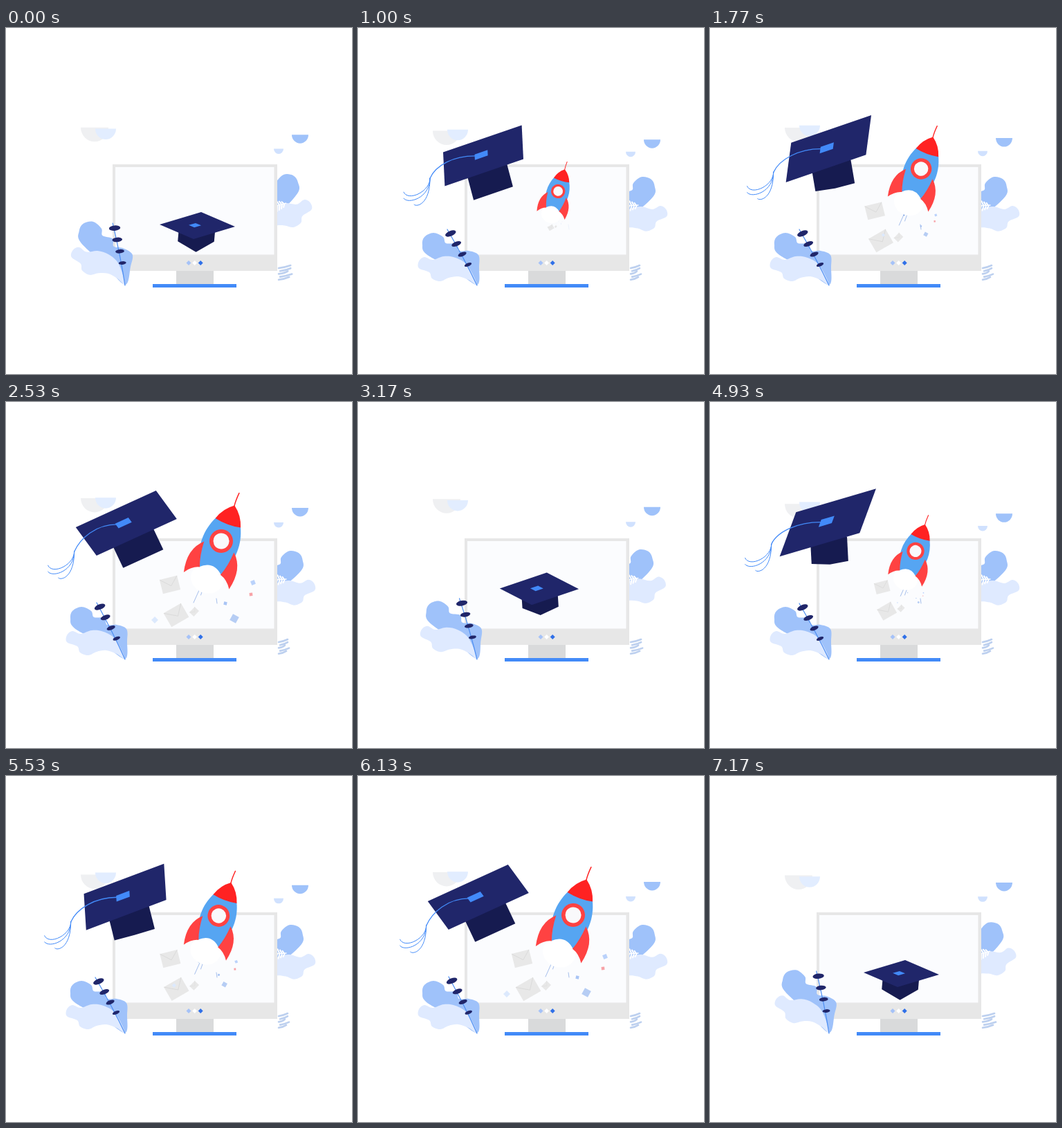
Write an HTML page with a canvas that moves like this. It is 500 by 500 pixels and loops after 7.21 s.

```html
<!DOCTYPE html>
<html lang="en">
<head>
<meta charset="utf-8">
<title>Launch of learning</title>
<style>
html, body { margin: 0; width: 100%; height: 100%; overflow: hidden; background: #fff; }
canvas { display: block; width: 500px; height: 500px; }
</style>
</head>
<body>
<canvas id="stage" width="500" height="500"></canvas>
<script>
const ctx = document.getElementById('stage').getContext('2d');
const LOOP = 7210, PERIOD = 3600, RAD = Math.PI / 180;
const NAVY = '#20266a', DEEP = '#161b50', BLUE = '#428af8', RED = '#ff4242';
const LEAF_BLUE = '#9fc2fa', PALE_BLUE = '#dfeaff';

// Time and value helpers
const clamp = x => Math.min(1, Math.max(0, x));
const span = (t, from, to) => clamp((t - from) / (to - from));
const ease = (t, from, to) => (1 - Math.cos(Math.PI * span(t, from, to))) / 2;
const out = (s, power) => 1 - (1 - s) ** power;
const mix = (a, b, s) => a + (b - a) * s;
const wave = (t, mid, amp, delay) => mid + amp * Math.sin((t - delay) / PERIOD * 2 * Math.PI);

// Drawing helpers
function fill(color, d) {
  ctx.fillStyle = color;
  ctx.fill(new Path2D(d));
}
function line(color, width, d) {
  ctx.strokeStyle = color;
  ctx.lineWidth = width;
  ctx.lineCap = ctx.lineJoin = 'round';
  ctx.stroke(new Path2D(d));
}
function rect(color, x, y, w, h) {
  ctx.fillStyle = color;
  ctx.fillRect(x, y, w, h);
}
function ellipse(color, x, y, rx, ry = rx, rot = 0, to = 360) {
  ctx.fillStyle = color;
  ctx.beginPath();
  ctx.ellipse(x, y, rx, ry, rot * RAD, 0, to * RAD);
  ctx.fill();
}
function placed(x, y, angle, scale, draw) {
  ctx.save();
  ctx.translate(x, y);
  ctx.rotate(angle * RAD);
  ctx.scale(scale, scale);
  draw();
  ctx.restore();
}
const poly = points => `M${points.join('L')}Z`;
const diamond = (color, x, y, r) => fill(color, poly([[x - r, y], [x, y - r], [x + r, y], [x, y + r]]));

// Closed smooth curve through all points
function closed(p) {
  const n = p.length, pick = i => p[(i + n) % n];
  const handle = (i, side) => pick(i).map((v, k) => v + side * (pick(i + 1)[k] - pick(i - 1)[k]) / 6);
  return `M${p[0]}` + p.map((_, i) => `C${handle(i, 1)} ${handle(i + 1, -1)} ${pick(i + 1)}`).join('') + 'Z';
}

// Lobed leaves, relative to the foot of the plant
const LEAF = [[0, -1], [3, -27], [2, -44], [-12, -50], [-26, -50], [-30, -60], [-45, -61], [-49, -70], [-63, -76],
  [-76, -70], [-79, -59], [-73, -45], [-32, -22]];
const PALE_LEAF = [[0, -1], [-14, -29], [-31, -40], [-48, -42], [-64, -37], [-76, -41], [-84, -35], [-84, -25],
  [-69, -19], [-65, -10], [-53, -6], [-41, -11], [-27, -13], [-12, -8]];

// Outer parts of a leaf swing further than the foot
function leaf(color, points, angle, stretch = 1) {
  fill(color, closed(points.map(([x, y]) => {
    const a = angle * RAD * (.7 + .3 * Math.hypot(x, y) / 92);
    return [(x * Math.cos(a) - y * Math.sin(a)) * stretch, (x * Math.sin(a) + y * Math.cos(a)) * stretch];
  })));
}

// The plants straighten slowly, then snap back as the cap takes off
function leanAt(t) {
  const since = t < 1500 ? t + PERIOD : t;
  return span(since, 2500, 4070) ** 1.4 * (1 - ease(since, 4070, 4400));
}

function clouds(t) {
  const half = (color, x, y, r) => ellipse(color, x, y, r, r + .5, 0, 180);
  half('#eff0f2', 128, wave(t, 143.7, 5, 0), 20);
  half('#e2edff', 144, wave(t, 143, 5, -300), 15);
  half(LEAF_BLUE, 425, wave(t, 156.5, 5, 280), 12);
  half('#d0e1fe', 394, wave(t, 176, 3, 300), 7);
}

function rightPlants(lean) {
  ctx.save();
  ctx.beginPath();
  ctx.rect(391, 190, 80, 190);
  ctx.clip();
  placed(364, 303, 0, 1, () => {
    ctx.scale(-1, 1);
    leaf(LEAF_BLUE, LEAF, 12 + lean * 8);
    leaf(PALE_BLUE, PALE_LEAF, 4 + lean * 12);
  });
  placed(391, 257, -lean * 20, 1, () => {
    line('#fff', 1.4, 'M-6,0L14,-1');
    for (let i = 0; i < 4; i++) {
      const x = i * 3.5, r = 8 - i * 1.3;
      line('#fff', 2, `M${x - 2},${-r}L${x + 1},0L${x - 1},${r}`);
    }
  });
  const reach = mix(13, 20, lean);
  for (let i = 0; i < 5; i++) {
    const y = 345 + i * 4.2, x = 394 + (i % 2) * 2;
    line('#bdd0ef', 2.6, `M${x},${y + 2}Q${x + reach / 2},${y + 1} ${x + reach - i % 3 * 2},${y - 2}`);
  }
  ctx.restore();
}

function monitor() {
  rect('#e7e7e7', 154, 197, 238, 154);
  rect('#fbfcfe', 158, 201, 229.5, 126.5);
  rect('#d9dadb', 246, 351, 54, 20);
  rect(BLUE, 212, 370, 121, 5);
  ['#a5c2f8', '#fff', '#2f70e8'].forEach((color, i) => diamond(color, 264 + i * 8.6, 339.5, 3.5));
}

function leftPlant(lean) {
  placed(172, 372, 0, 1, () => {
    leaf(LEAF_BLUE, LEAF, lean * 21, 1 + lean * .07);
    leaf(PALE_BLUE, PALE_LEAF, lean * 19);
  });
  placed(172, 372, 21.5 * lean ** .5, 1, () => {
    line('#4b8df2', 1.2, 'M0,0Q-17,-36 -43,-81');
    for (let i = 0; i < 4; i++) {
      const x = -13 - i * 8.4, y = -30 - i * 15;
      ellipse(NAVY, x, y, 5.5 + i * .9, 2.4 + i * .45, -22);
    }
  });
}

// Final x, y and size of what the rocket throws out; the first three are letters
const DEBRIS = [[237, 264, 26], [246, 308, 29], [272, 303, 11],
  [271, 261, 3], [357, 261, 6], [354, 278, 4.5], [317, 291, 4.5], [330, 313, 10], [215, 315, 7]];
const TINTS = ['#4a82d8', '#bad2fb', '#f7a3a8', '#a9c5f5', '#b6cdf4', '#dce9fd'];

function debris(t) {
  const gone = ease(t, 2600, 2950), flight = span(t, 900, 2530);
  if (flight === 0 || gone === 1) return;
  DEBRIS.forEach(([x, y, size], i) => {
    const letter = i < 3, s = letter ? out(flight, 5) : flight;
    placed(mix(291, x, s), mix(281, y, s), letter ? -14 - i * 16 : i * 17, size * s * (1 - gone), () => {
      if (!letter) return rect(TINTS[i - 3], -.5, -.5, 1, 1);
      rect('#e8e8e8', -.5, -.4, 1, .8);
      line('#dadada', .035, 'M-.48,-.38L.05,.08L.48,-.38');
    });
  });
  ctx.globalAlpha = ease(t, 950, 1150) * (1 - gone);
  line('#a6bfec', 1, `M284,261L${mix(284, 271, flight ** .3)},${mix(261, 290, flight ** .3)}M285,269L281.5,279M304,284L305,291`);
  ctx.globalAlpha = 1;
}

function rocket(t) {
  const shown = ease(t, 200, 470) * (1 - ease(t, 2950, 3300));
  if (shown === 0) return;
  const rise = Math.sin(span(t, 470, 2530) * Math.PI / 2) * (1 - ease(t, 2530, 3200));
  const x = mix(275, 311, rise), y = mix(296, 201, out(rise, 2));
  placed(x, y, 20.5 * out(rise, 3.5), mix(.34, 1, rise) * shown, () => {
    ellipse('#fff', 0, 58, 24, 21);
    line('#ff2626', 1.5, 'M0,-54Q-1,-62 0,-74');
    fill('#56a5f2', 'M-19,-29C-30,-6 -30,18 -17,46Q0,30 17,46C30,18 30,-6 19,-29Z');
    fill('#ff2222', 'M0,-55Q14,-45 19.5,-28Q0,-24 -19.5,-28Q-14,-45 0,-55Z');
    for (const s of [-1, 1]) fill(RED, `M${s * 23},9Q${s * 43},27 ${s * 35},61Q${s * 27},49 ${s * 16},46Q${s * 22},30 ${s * 23},9Z`);
    ellipse(RED, 0, 0, 17);
    ellipse('#f9f9fb', 0, 0, 11.5);
  });
}

// Board centre, its two half axes, how far the band hangs, and how much a corner faces the viewer
const REST = { c: [276.5, 285.5], u: [30, -9], v: [24.5, 10.5], hang: [-2, 23], corner: [.46] };
const CAP = [
  [0, REST],
  [470, { c: [257, 267.5], u: [39.8, -4], v: [14.2, 14], hang: [7.5, 36], corner: [0] }],
  [1000, { c: [181, 184.5], u: [56.8, -19.5], v: [1.2, 24.5], hang: [14.5, 54.5], corner: [0] }],
  [1330, { c: [170.3, 174.3], u: [57.8, -17], v: [-11.8, 32], hang: [3, 57.5], corner: [.2] }],
  [2530, { c: [173.8, 175], u: [58, -26.5], v: [15, 20.5], hang: [24.5, 51.5], corner: [0] }],
  [3380, REST],
  [PERIOD, REST]
];

function capPose(t) {
  const i = CAP.findIndex(([time]) => time > t);
  const [t0, from] = CAP[i - 1], [t1, to] = CAP[i];
  // The launch runs straight through its middle pose, the rest eases
  const s = t1 === 1000 ? Math.sin(span(t, t0, t1) * Math.PI / 2) : ease(t, t0, t1);
  const pose = {};
  for (const name in from) pose[name] = from[name].map((v, k) => mix(v, to[name][k], s));
  return pose;
}

function cap(t) {
  const { c, u, v, hang, corner: [corner] } = capPose(t);
  const spot = (a, b, h = 0, sag = 0) => [0, 1].map(k => c[k] + u[k] * a + v[k] * b + hang[k] * h + sag * k);
  const square = (x, y, r) => poly([spot(x - r, y - r), spot(x + r, y - r), spot(x + r, y + r), spot(x - r, y + r)]);

  const low = spot(0, 0, 1, 72 * corner ** 2);
  const left = spot(-.5, -corner, 1), right = spot(.5, corner, 1);
  fill(DEEP, `M${spot(-.5, -corner, .4)}L${left}L${low}L${right}L${spot(.5, corner, .4)}L${c}Z`);
  fill(NAVY, square(0, 0, 1));
  fill(BLUE, square(-.05, -.08, .165));

  const grow = ease(t, 480, 980) * (1 - ease(t, 2600, 3200));
  if (grow < .03) return;
  const [sx, sy] = spot(-.15, -.1), end = spot(-1.36, .25);
  const kx = mix(sx, end[0], grow), ky = mix(sy, end[1], grow);
  line(BLUE, 1.3, `M${sx},${sy}C${sx - 35 * grow},${sy - 1} ${kx + 8 * grow},${ky - 18 * grow} ${kx},${ky}`);
  for (let i = 0; i < 3; i++) {
    const reach = (i < 2 ? 38 : 23) * grow, drop = (20 + i * 9) * grow;
    line(BLUE, 1, `M${kx},${ky}C${kx},${ky + drop} ${kx - reach * .85},${ky + drop + (14 - i * 5) * grow} ${kx - reach},${ky + drop}`);
  }
}

function draw(t) {
  const lean = leanAt(t);
  ctx.clearRect(0, 0, 500, 500);
  clouds(t);
  rightPlants(lean);
  monitor();
  debris(t);
  rocket(t);
  leftPlant(lean);
  cap(t);
}

const start = performance.now();
function tick() {
  draw((performance.now() - start) % LOOP % PERIOD);
  requestAnimationFrame(tick);
}
tick();
</script>
</body>
</html>
```
